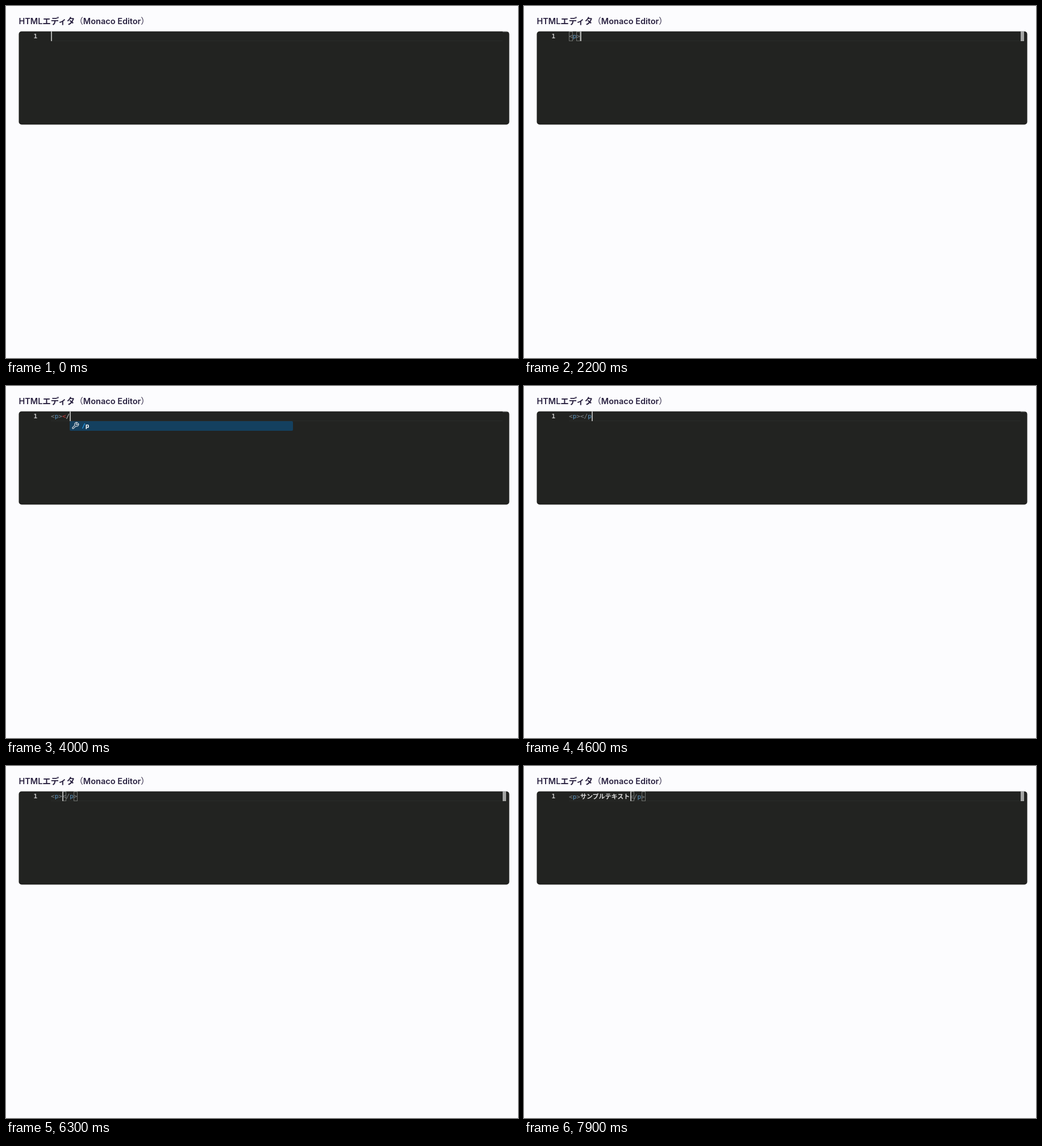
Recreate the animation shown at these times as an HTML page. Size 901x621 px, loop 8 s.

```html
<!DOCTYPE html>
<html lang="ja">
<head>
<meta charset="utf-8">
<title>HTMLエディタ</title>
<style>
  html, body { margin: 0; width: 100%; height: 100%; overflow: hidden; background: #fcfcfe; }
  #stage { position: relative; width: 901px; height: 621px; overflow: hidden; }
  #stage div, #stage svg { position: absolute; box-sizing: border-box; }
  #title {
    left: 22.4px; top: 17px; white-space: pre; color: #292140;
    font: 600 14.5px/20px Inter, "Noto Sans CJK JP", "Noto Sans CJK", sans-serif;
  }
  #title span { font-weight: 400; }
  #editor { left: 0; top: 0; width: 901px; height: 621px; }
  .mono {
    white-space: pre;
    font: 11px/17px "DejaVu Sans Mono", "Noto Sans CJK JP", "Noto Sans CJK", monospace;
  }
  #lineNumber { left: 48.5px; top: 45px; color: #c6c6c6; font-weight: bold; }
  #currentLine { left: 79px; top: 45px; width: 795px; height: 17px; border-bottom: 1px solid #292b29; }
  #code { left: 79px; top: 45px; height: 17px; }
  .cjk { font-weight: 700; font-family: "Noto Sans CJK JP", "Noto Sans CJK", sans-serif; }
  .bracket { top: 45px; width: 7px; height: 17px; border: 1px solid #707370; }
  #caret { top: 45px; width: 2px; height: 17px; background: #aeafad; }
  #ruler { left: 874px; top: 45px; }
  #popup { top: 62px; width: 393px; height: 17px; border-radius: 2px; background: #14405f; overflow: hidden; }
  #popup svg { left: 3px; top: 1px; width: 14px; height: 14px; }
  #label { left: 21.7px; top: 0; color: #fff; font-weight: bold; }
  #thumb { right: 0; top: 0; width: 10px; height: 100%; background: #2f4d68; }
</style>
</head>
<body>
<div id="stage">
  <div id="title">HTMLエディタ<span>（</span>Monaco Editor<span>）</span></div>
  <svg id="editor"><rect x="22.5" y="44.7" width="863.1" height="164.5" rx="5" fill="#222321"/></svg>
  <div id="currentLine"></div>
  <div id="lineNumber" class="mono">1</div>
  <div id="code" class="mono"></div>
  <div id="open" class="bracket"></div>
  <div id="close" class="bracket"></div>
  <div id="caret"></div>
  <div id="ruler"></div>
  <div id="popup">
    <svg viewBox="0 0 24 24" fill="none" stroke="#d8dde2" stroke-width="2">
      <path d="M14.7 6.3a1 1 0 0 0 0 1.4l1.6 1.6a1 1 0 0 0 1.4 0l3.77-3.77a6 6 0 0 1-7.94 7.94l-6.91 6.91a2.12 2.12 0 0 1-3-3l6.91-6.91a6 6 0 0 1 7.94-7.94l-3.76 3.76z"/>
    </svg>
    <div id="label" class="mono"></div>
    <div id="thumb"></div>
  </div>
</div>
<script>
const LOOP = 8000, BLINK = 500, LEFT = 79;
const ASCII_WIDTH = 6.62, CJK_WIDTH = 11;
const $ = id => document.getElementById(id);

// Each step: start time and text, with "|" marking the caret.
const steps = [
  [0, '|'],
  [1200, '<|'],
  [1700, '<p|'],
  [2000, '<p>|'],
  [3200, '<p><|'],
  [3700, '<p></|'],
  [4400, '<p></p|'],
  [5000, '<p></p>|'],
  [6000, '<p></p|>'],
  [6080, '<p></|p>'],
  [6160, '<p><|/p>'],
  [6240, '<p>|</p>']
];
[6400, 6550, 6700, 6850, 7150, 7350, 7550, 7750].forEach((time, i) =>
  steps.push([time, `<p>${'サンプルテキスト'.slice(0, i + 1)}|</p>`]));

const popups = [
  { from: 1300, to: 1700, x: 85, label: '!DOCTYPE', thumb: true },
  { from: 3800, to: 4400, x: 111.5, label: '<span style="color:#2aaaff">/</span>p', thumb: false }
];

const isCjk = char => char > '\u3000';
const xAt = (text, index) => [...text.slice(0, index)]
  .reduce((x, char) => x + (isCjk(char) ? CJK_WIDTH : ASCII_WIDTH), LEFT);
const show = (element, visible) => { element.style.display = visible ? 'block' : 'none'; };

function colorOf(text, index) {
  const char = text[index];
  if (isCjk(char)) return '#dcdcdc';
  if (char === 'p') return '#5f98c4';
  const lastOpen = text.lastIndexOf('<');
  const incomplete = !/[p>]/.test(text.slice(lastOpen));
  if (incomplete && index >= lastOpen) return char === '<' ? '#d23f3f' : '#d4d4d4';
  return '#84898c';
}

function paintCode(text) {
  $('code').innerHTML = [...text].map((char, i) => {
    const glyph = char.replace('<', '&lt;').replace('>', '&gt;');
    return `<span class="${isCjk(char) ? 'cjk' : ''}" style="color:${colorOf(text, i)}">${glyph}</span>`;
  }).join('');
}

function matchedPair(text, caret) {
  for (const i of [caret, caret - 1]) {
    if (text[i] === '<') {
      const end = text.indexOf('>', i);
      if (end > 0) return [i, end];
    }
    if (text[i] === '>') return [text.lastIndexOf('<', i), i];
  }
  return null;
}

function paintStep(value) {
  const caret = value.indexOf('|');
  const text = value.replace('|', '');
  const pair = matchedPair(text, caret);
  paintCode(text);
  $('caret').style.left = xAt(text, caret) + 'px';
  ['open', 'close'].forEach((id, i) => {
    show($(id), pair);
    if (pair) $(id).style.left = xAt(text, pair[i]) + 'px';
  });
  Object.assign($('ruler').style, pair
    ? { width: '6px', height: '17px', background: '#a3a4a3' }
    : { width: '9px', height: '1px', background: '#777977' });
}

function paintPopup(popup) {
  show($('popup'), popup);
  if (!popup) return;
  $('popup').style.left = popup.x + 'px';
  $('label').innerHTML = popup.label;
  show($('thumb'), popup.thumb);
}

let lastStep, lastPopup = null;
function draw() {
  const time = performance.now() % LOOP;
  const step = steps.filter(([start]) => start <= time).pop();
  const popup = popups.find(({ from, to }) => time >= from && time < to);
  if (step !== lastStep) paintStep((lastStep = step)[1]);
  if (popup !== lastPopup) paintPopup(lastPopup = popup);
  show($('caret'), Math.floor((time - step[0]) / BLINK) % 2 === 0);
  requestAnimationFrame(draw);
}
draw();
</script>
</body>
</html>
```
